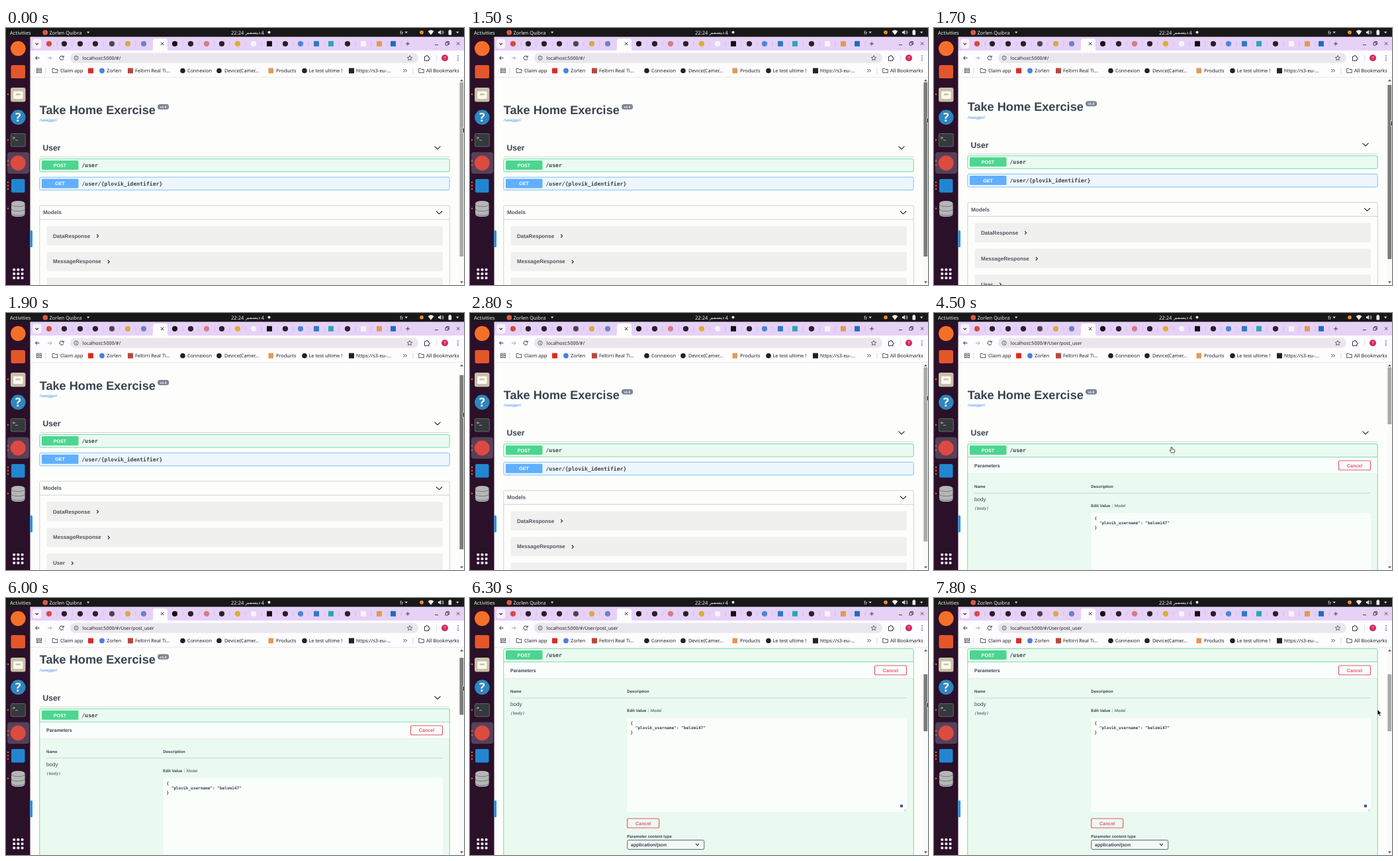
Animation of 692x388 px, one loop 8000 ms. Source, as an HTML page:

```html
<!DOCTYPE html>
<html lang="en">
<head>
<meta charset="utf-8">
<title>API documentation walkthrough</title>
<style>
html, body { margin: 0; width: 100%; height: 100%; overflow: hidden; background: #fdfefb; }
svg { display: block; width: 692px; height: 388px; }
text { font-family: "Liberation Sans", Arial, sans-serif; fill: #3b4151; text-rendering: geometricPrecision; }
.ui { font-family: "Noto Sans", "Open Sans", sans-serif; fill: #222; }
.mono { font-family: "DejaVu Sans Mono", monospace; }
.b { font-weight: 700; }
.i { font-style: italic; }
</style>
</head>
<body>
<svg viewBox="0 0 692 388">
  <g id="page">
    <g id="head"></g>
    <g id="closed"></g>
    <g id="open"></g>
  </g>
  <g id="bar"></g>
  <g id="chrome"></g>
  <g id="dock"></g>
  <g id="cursor">
    <path id="arrow" d="M0 0V9L2 7.2L3.4 10.2L4.9 9.5L3.5 6.6H6.2Z" fill="#111" stroke="#fff" stroke-width=".6"/>
    <path id="hand" d="M-.9 .8Q0-.4 .9 .8V3.6L4 4.2Q5 4.6 4.8 6L4 9H-.6L-3 5.6Q-2.6 4.5-.9 5.6Z" fill="#fff" stroke="#222" stroke-width=".8"/>
    <path id="beam" d="M-1.8-4H1.8M0-4V4M-1.8 4H1.8" fill="none" stroke="#222" stroke-width=".8"/>
  </g>
</svg>
<script>
const $ = id => document.getElementById(id);
const GREEN = '#4cd68f', BLUE = '#61affe', INK = '#3b4151', RED = '#e8586a';

function add(parent, tag, attrs, content) {
  const el = document.createElementNS('http://www.w3.org/2000/svg', tag);
  for (const k in attrs) el.setAttribute(k, attrs[k]);
  if (content) el.textContent = content;
  parent.append(el);
  return el;
}

// Drawing helpers bound to one group; text is placed by its vertical centre.
const pen = g => ({
  rect: (x, y, width, height, fill, more) => add(g, 'rect', { x, y, width, height, fill, ...more }),
  dot: (cx, cy, r, fill, more) => add(g, 'circle', { cx, cy, r, fill, ...more }),
  line: (d, stroke, w = 1) => add(g, 'path', { d, stroke, fill: 'none', 'stroke-width': w }),
  shape: (d, fill) => add(g, 'path', { d, fill }),
  text: (x, cy, s, size, cls = '', more) =>
    add(g, 'text', { x, y: cy + size * .36, 'font-size': size, class: cls, ...more }, s)
});
const mid = fill => ({ 'text-anchor': 'middle', style: 'fill:' + fill });
const ink = fill => ({ style: 'fill:' + fill });

function row(p, y, method, path, color, h = 19.5) {
  p.rect(50.8, y + .5, 619.4, h, color, { 'fill-opacity': .1, stroke: color, 'stroke-width': .8, rx: 2 });
  p.rect(54, y + 3, 55.5, 14, color, { rx: 1.5 });
  p.text(81.5, y + 10.2, method, 7.1, 'b', mid('#fff'));
  p.text(114.5, y + 10, path, 8.1, 'mono b');
}

function cancel(p, x, y) {
  p.rect(x, y, 48, 14, 'none', { stroke: RED, 'stroke-width': 1.2, rx: 2 });
  p.text(x + 24, y + 7, 'Cancel', 7.1, 'b', mid(RED));
}

function drawPage() {
  const h = pen($('head'));
  h.text(50.7, 123, 'Take Home Exercise', 18.15, 'b');
  h.rect(229, 115, 17.3, 8, '#7d8492', { rx: 4 });
  h.text(237.6, 119, 'v1.0', 5, 'b', mid('#fff'));
  h.text(51, 139, '/swagger/', 6.08, '', ink('#4990e2'));
  h.text(55.5, 181, 'User', 12.2, 'b');
  h.line('M647.5 178.6L652 182.9L656.5 178.6', '#222', 1.1);
  h.line('M51 194.5H670', '#c9cbcf', .8);

  const c = pen($('closed'));
  row(c, 197, 'POST', '/user', GREEN);
  row(c, 224.7, 'GET', '/user/{plovik_identifier}', BLUE);
  c.rect(50.8, 268, 619.4, 150, 'none', { stroke: '#c3c6c8', 'stroke-width': .8, rx: 2 });
  c.line('M51 289H670', '#c3c6c8', .8);
  c.text(56, 278.5, 'Models', 8.1, 'b', ink('#505664'));
  c.line('M650 276.5L654.5 280.8L659 276.5', '#222', 1.1);
  ['DataResponse', 'MessageResponse', 'User'].forEach((name, i) => {
    const y = 299 + i * 38.9;
    c.rect(61.5, y, 598.5, 29.3, '#f0f1ee', { rx: 2 });
    const label = c.text(71, y + 14.6, name, 8.1, 'b', ink('#505664'));
    const x = 71 + label.getComputedTextLength() + 10;
    c.line(`M${x} ${y + 12.6}l2.4 2.4l-2.4 2.4`, '#222', 1.1);
  });

  const o = pen($('open'));
  row(o, 197, 'POST', '/user', GREEN, 620);
  o.line('M51 217.5H670', GREEN, .7);
  o.rect(51.4, 218, 618.4, 24.5, '#fff', { 'fill-opacity': .7 });
  o.line('M51.4 242.7H669.8', '#dce9e1', .7);
  o.text(61, 230, 'Parameters', 7.1, 'b');
  cancel(o, 611.5, 223);
  o.text(61, 262.3, 'Name', 6.08, 'b');
  o.text(237.3, 262.3, 'Description', 6.08, 'b');
  o.line('M61 272H660', '#b9c9c2', .8);
  o.text(61, 281.3, 'body', 8.1);
  o.text(61, 295, '(body)', 6.08, 'mono b i', ink('#6f7680'));
  o.text(237.3, 291, 'Edit Value', 6.08, 'b');
  o.line('M269.5 287.8V294', '#b5bfbb', .7);
  o.text(272.8, 291, 'Model', 6.08);
  o.rect(237.5, 302, 422.5, 142, '#f9fefb', { rx: 2 });
  o.text(242.5, 310.3, '{', 6.08, 'mono b');
  o.text(249.8, 317.2, '"plovik_username": "belomi47"', 6.08, 'mono b');
  o.text(242.5, 324.1, '}', 6.08, 'mono b');
  o.dot(652, 435, 2.3, '#4a4ab8');
  o.line('M655.5 443l3.5-3.5M657.5 443l1.5-1.5', '#888', .6);
  cancel(o, 237.7, 454);
  o.text(237.3, 481, 'Parameter content type', 6.08, 'b');
  o.rect(237.8, 486.5, 116, 14, '#f4f9f6', { stroke: INK, 'stroke-width': .8, rx: 2 });
  o.text(243, 493.4, 'application/json', 7.1, 'b');
  o.line('M341 492l2.5 2.7l2.5-2.7', '#222', 1.1);
}

function drawBar() {
  const b = pen($('bar'));
  b.rect(685, 74, 7, 314, '#fafafa');
  b.shape('M686 80.5h5l-2.5-3z', '#555');
  b.shape('M686 382.5h5l-2.5 3z', '#555');
  b.rect(685.4, 82, 5.8, 263, '#aaa').id = 'thumb';
}

function drawChrome() {
  const c = pen($('chrome'));
  c.rect(36, 13, 656, 21.5, '#e6d1f7');
  c.rect(36, 34, 656, 40.5, '#fdfcfe');
  c.line('M36 74.5H692', '#e4e2e6', .7);

  // Tabs
  c.rect(40, 16.5, 13.5, 14.5, '#f8f1fd', { rx: 4 });
  c.line('M44.5 22.8l2.2 2.2l2.2-2.2', '#222', 1.1);
  c.shape('M219 34.5q3 0 3-3V20q0-4 4-4h14q4 0 4 4v11.5q0 3 3 3z', '#fdfcfe');
  c.line('M234 21.5l4.4 4.4m0-4.4l-4.4 4.4', '#222', 1);
  const dark = '#26222c';
  const tabs = [
    [65, '#d9493e'], [88, dark], [112, dark], [135, dark], [160, '#4b4652'], [184, '#d8aa42'], [208, '#6b83c8'],
    [255, '#111'], [279, dark], [303, '#d77b83'], [326, dark], [350, '#d9b02f'], [374, '#f7f4fb'],
    [398, '#111', 1], [422, dark], [445, '#4d84dd'], [469, '#3179c9', 1], [491, '#25a9b8', 1],
    [516, dark], [540, '#f7f4fb', 1], [564, '#e39a55', 1], [585, '#1b6fb8', 1]
  ];
  for (const [x, fill, square] of tabs) {
    square ? c.rect(x - 4, 19.8, 8, 8, fill, { rx: .6 }) : c.dot(x, 23.8, 4.1, fill);
    if (x !== 208) c.line(`M${x + 12} 20v7.6`, '#cbb3de', .6);
  }
  c.line('M604 23.8h6m-3-3v6M648 25.5h5M664 22h4v4h-4zM665.5 22v-1.5h4v4h-1.5M681 21.5l4.2 4.2m0-4.2l-4.2 4.2', '#333', .9);

  // Address row
  c.line('M50.5 45.3h-6m2.7-2.7l-2.7 2.7l2.7 2.7', '#333', 1);
  c.line('M63 45.3h6m-2.7-2.7l2.7 2.7l-2.7 2.7', '#aaa', 1);
  c.line('M86.6 43.6a3 3 0 1 0 .4 2.4M87.2 41.8v2.3h-2.4', '#333', 1);
  c.rect(97, 37.8, 526, 15, '#eae6ed', { rx: 7.5 });
  c.dot(106, 45.3, 3.1, 'none', { stroke: '#444', 'stroke-width': .8 });
  c.line('M106 44.8v2.1M106 43.2v.9', '#444', .8);
  c.text(115.7, 45.3, 'localhost:5000/#/', 7.05, 'ui').id = 'url';
  c.line('M610 41.6l1.1 2.4l2.6 .3l-1.9 1.8l.5 2.6l-2.3-1.3l-2.3 1.3l.5-2.6l-1.9-1.8l2.6-.3z', '#444', .8);
  c.line('M632.5 43h2q0-1.8 1.3-1.8t1.3 1.8h1.7v2q1.6 0 1.6 1.2t-1.6 1.2v2h-6.3z', '#333', 1);
  c.line('M650.5 41v9', '#e0d2ee', .8);
  c.dot(663, 45.3, 5, '#d6285c');
  c.text(663, 45.3, 'T', 5.5, 'ui', mid('#fff'));
  for (const y of [42, 45.2, 48.4]) c.dot(683, y, .8, '#333');

  // Bookmarks
  const folder = x => c.line(`M${x - 3.8} 61.2h3l1 1.2h3.6v5h-7.6z`, '#444', .9);
  for (const x of [46.3, 50.8]) for (const y of [61, 65]) c.rect(x, y, 2.6, 2.6, 'none', { stroke: '#444', 'stroke-width': .8 });
  c.line('M59.5 60v9M615 60v9', '#d9cce6', .8);
  folder(74);
  folder(627.5);
  c.rect(124, 60.5, 8, 8, '#e02a25', { rx: 1 });
  c.dot(145, 64.5, 3.9, '#4a82dc');
  c.rect(184, 60.5, 8, 8, '#b8483a');
  for (const x of [267, 322, 451]) c.dot(x, 64.5, 3.8, '#222');
  c.rect(396.5, 60.5, 7.5, 8, '#e39a55');
  c.rect(518, 60.5, 8, 8, '#222');
  const marks = [
    [82, 'Claim app'], [152, 'Zorlen'], [195, 'Feltirri Real Ti...'], [274, 'Connexion'], [330, 'Device(Camer…'],
    [408, 'Products'], [457.5, 'Le test ultime !'], [529, 'https://s3-eu-…']
  ];
  for (const [x, s] of marks) c.text(x, 64.3, s, 7.35, 'ui');
  c.text(635, 64.3, 'All Bookmarks', 7.4, 'ui');
  c.line('M600.5 62l2.2 2.3l-2.2 2.3m2.8-4.6l2.2 2.3l-2.2 2.3', '#333', .9);
}

function drawDock() {
  const d = pen($('dock'));
  d.rect(0, 13, 36.5, 375, '#2b1029');
  d.rect(36.5, 305.5, 3.5, 25.5, '#2196ea', { rx: 1.5 });
  d.rect(0, 0, 692, 13.3, '#191818');

  // Desktop bar
  const white = ink('#eee');
  d.text(6, 6.8, 'Activities', 7.6, 'ui', white);
  d.dot(59.3, 6.8, 3.9, '#d9574b');
  d.text(65.5, 6.8, 'Zorlen Quibra', 7.5, 'ui', white);
  d.text(340, 6.8, '22:24', 7.6, 'ui', white);
  d.text(373, 6.6, 'ديسمبر', 7.4, 'ui', mid('#eee'));
  d.text(385.5, 6.8, '4', 7.6, 'ui', white);
  d.dot(397.5, 6.6, 2, '#eee');
  d.text(595, 6.8, 'fr', 7.6, 'ui', white);
  for (const x of [122, 602.5, 680]) d.shape(`M${x} 5.5h4.4l-2.2 2.8z`, '#ddd');
  d.dot(628, 6.6, 2.9, '#f08a24');
  d.shape('M637.6 5q4.4-4 8.8 0l-4.4 5.4z', '#eee');
  d.shape('M653 5.3h1.8l2.2-2.2v7l-2.2-2.2h-1.8z', '#eee');
  d.line('M658.3 4.6q1.6 2 0 4M659.8 3.4q2.6 3.2 0 6.4', '#eee', .8);
  d.rect(668.5, 3.6, 4.6, 7, '#eee', { rx: .8 });
  d.rect(669.8, 2.5, 2, 1.2, '#eee');

  // Launchers
  d.rect(2, 187.5, 33, 32.5, '#57405a', { rx: 4 });
  d.dot(18.3, 31, 11.3, '#f4702a');
  d.rect(7.5, 56, 21.5, 20, '#e3562c', { rx: 2.5 });
  d.rect(7, 90, 22.5, 21.5, '#c9c0aa', { rx: 3 });
  d.rect(11, 95.5, 14.5, 11.5, '#fbf8ee', { rx: 1.5 });
  d.rect(14.5, 99, 7.5, 2.6, '#c9c0aa', { rx: 1 });
  d.dot(18.3, 134.8, 11.2, '#2e86c1');
  d.text(18.3, 134.8, '?', 18, 'ui b', mid('#fff'));
  d.rect(7.3, 159.5, 22, 19.5, '#343a3c', { rx: 2, stroke: '#70777a', 'stroke-width': .8 });
  d.text(10, 166, '>_', 6.5, 'mono b', white);
  d.dot(18.3, 203.8, 11.4, '#dc4b3f');
  d.rect(8, 228, 20.5, 20.5, '#2186cf', { rx: 2 });
  d.shape('M8 265.5q0-4.5 10.3-4.5t10.3 4.5v15q0 4.5-10.3 4.5t-10.3-4.5z', '#b4b6b8');
  d.line('M8 265.5q0 4 10.3 4t10.3-4M8 272.5q0 4 10.3 4t10.3-4M8 279q0 4 10.3 4t10.3-4', '#77797c', 1);
  for (const y of [100, 169, 200.5, 207, 233, 238, 243, 272.5]) d.dot(3, y, 1.2, '#e8622f');
  for (let i = 0; i < 9; i++) d.rect(10.3 + i % 3 * 6.2, 363 + Math.floor(i / 3) * 6.2, 3.8, 3.8, '#f3eef3', { rx: 1.2 });
}

// Keys are [time, value, ...]; values run straight from one key to the next.
function at(keys, t) {
  const n = keys.findIndex(k => k[0] > t);
  if (n < 0) return keys[keys.length - 1].slice(1);
  const a = keys[n - 1], b = keys[n], f = (t - a[0]) / (b[0] - a[0]);
  return a.slice(1).map((v, i) => v + (b[i + 1] - v) * f);
}

const scrollKeys = [
  [0, 0], [700, 0], [1100, 40], [1500, 0], [1600, 0], [1900, 14], [2100, 24], [2400, 0], [5900, 0], [6300, 121]
];
const cursorKeys = [
  [0, 690.5, 150], [700, 690.5, 150], [1100, 690.5, 184], [1500, 690.5, 135], [1600, 690.5, 135],
  [1900, 690.5, 149], [2100, 690.5, 158], [2400, 690.5, 124], [3400, 690.5, 124], [4000, 359, 202],
  [4700, 359, 202], [5000, 619, 243], [5100, 619, 243], [5400, 648, 218], [5500, 648, 218], [5600, 690.5, 124],
  [5900, 690.5, 124], [6300, 690.5, 157], [6400, 690.5, 157], [6800, 552, 130], [6900, 552, 130],
  [7100, 388, 198], [7200, 388, 198], [7800, 670, 168]
];
const between = (v, a, b) => v >= a && v <= b;

function pointer(x, y) {
  const onRow = between(x, 51, 669) && between(y, 197, 217);
  const onCancel = between(x, 611, 660) && between(y, 222, 237);
  return onRow || onCancel ? 'hand' : 'arrow';
}

function draw(now) {
  const t = Math.floor(now % 8000 / 100) * 100;
  const opened = t >= 4500;
  const [scroll] = at(scrollKeys, t);
  const [x, y] = at(cursorKeys, t);
  const dragging = between(t, 800, 2700) || between(t, 5800, 6400);

  $('page').setAttribute('transform', `translate(0 ${-scroll})`);
  $('closed').style.display = opened ? 'none' : '';
  $('open').style.display = opened ? '' : 'none';
  $('url').textContent = 'localhost:5000/#/' + (opened ? 'User/post_user' : '');

  const thumb = $('thumb');
  thumb.setAttribute('y', 82 + scroll * (opened ? .274 : .837));
  thumb.setAttribute('height', opened ? 86 : 263);
  thumb.setAttribute('fill', dragging ? '#7c7c7c' : '#aaa');

  const inEditor = scroll > 100 && between(x, 238, 660) && between(y, 181, 323);
  const kind = inEditor ? 'beam' : scroll > 100 ? 'arrow' : pointer(x, y);
  for (const id of ['arrow', 'hand', 'beam']) $(id).style.display = id === kind ? '' : 'none';
  $('cursor').setAttribute('transform', `translate(${x} ${y})`);
}

drawPage();
drawBar();
drawChrome();
drawDock();
const start = performance.now();
(function loop() {
  draw(performance.now() - start);
  requestAnimationFrame(loop);
})();
</script>
</body>
</html>
```
